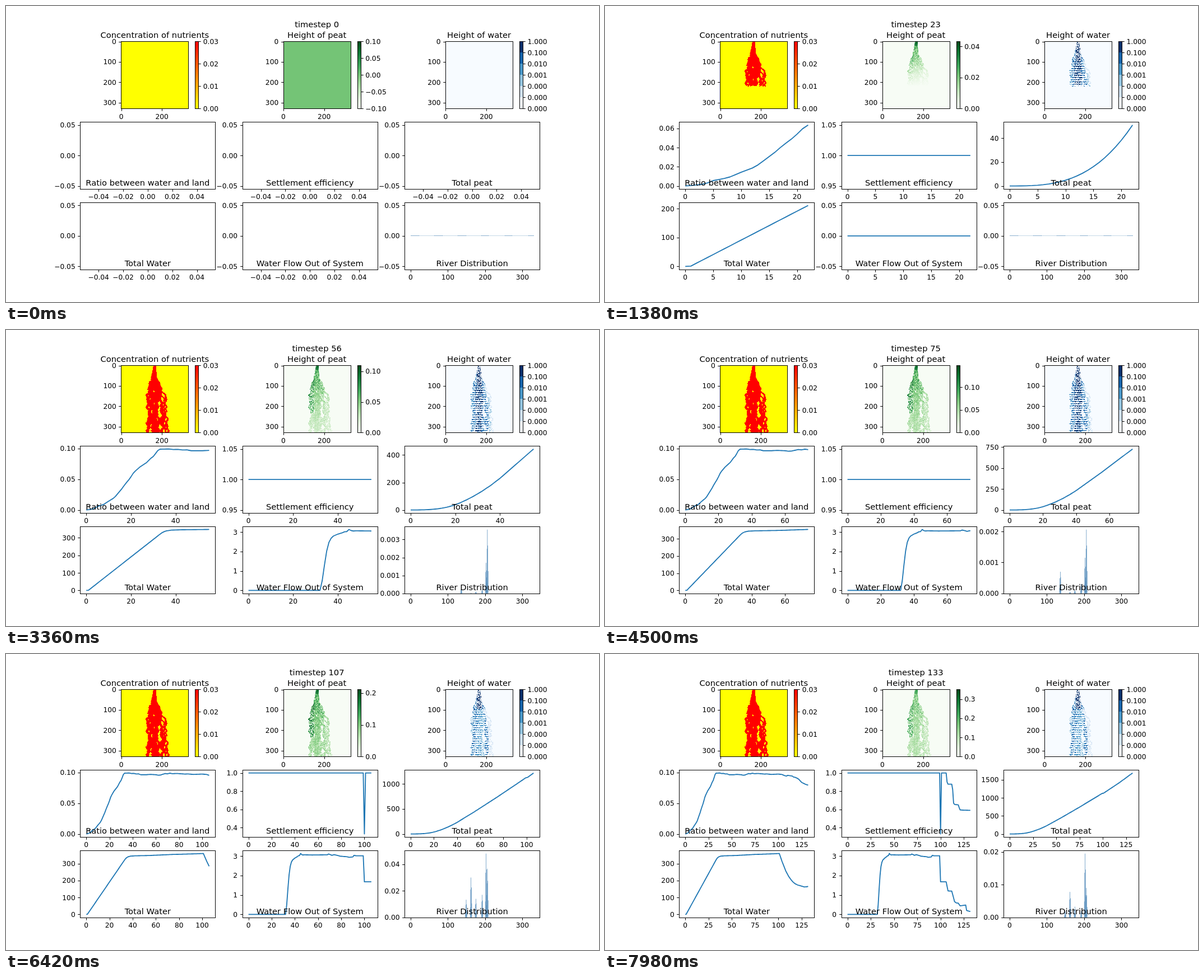
Animation of 1058 by 529 pixels, one loop 8000 ms. Source, as an HTML page with a canvas:

```html
<!DOCTYPE html>
<html lang="en">
<head>
<meta charset="utf-8">
<title>Peat simulation</title>
<style>
html, body { margin: 0; width: 100%; height: 100%; overflow: hidden; background: #fff; }
canvas { display: block; }
</style>
</head>
<body>
<canvas id="stage" width="1058" height="529"></canvas>
<script>
const ctx = document.getElementById('stage').getContext('2d');
const LOOP = 8000, STEP = 60, PT = 1058 / 12 / 72;
const SMALL = 10 * PT, LARGE = 12 * PT, TICK = 3.5 * PT;
const AW = 241.16, AH = 119.8, SIZE = 120, UNIT = AH / 330;
const colX = c => 132.25 + c * 289.395;
const rowY = r => 63.48 + r * 143.76;
const snap = v => Math.round(v) + .5;

// Time series as flat index/value pairs
const RATIO = [0, 9.18e-6, 1, .0004, 2, .001, 3, .0018, 4, .0032, 5, .0056, 7, .0079, 8, .0094,
  10, .0143, 12, .0187, 13, .0219, 15, .0306, 16, .0349, 17, .04, 18, .0446, 19, .0489, 20, .054,
  21, .0597, 22, .0636, 24, .07, 27, .0772, 29, .0845, 30, .0872, 31, .0918, 32, .0968, 33, .099,
  37, .0993, 39, .0985, 41, .0986, 43, .0977, 45, .0979, 47, .0965, 52, .0965, 55, .0971,
  60, .0965, 62, .0957, 64, .096, 66, .0972, 68, .0984, 70, .0979, 72, .099, 74, .0982, 78, .0985,
  85, .0976, 88, .0978, 92, .097, 100, .0976, 104, .0968, 107, .0949, 109, .0944, 110, .0955,
  115, .0943, 116, .093, 118, .0922, 120, .091, 122, .089, 125, .084, 129, .081, 132, .0795];
const SETTLE = [0, 1, 99, 1, 100, .331, 101, 1, 106, 1, 107, .9, 108, .878, 112, .878, 113, .82,
  114, .67, 115, .655, 119, .65, 120, .62, 121, .595, 125, .592, 132, .59];
const PEAT = [22, 51, 25, 73.4, 28, 98.7, 32, 137, 36, 181, 40, 231, 55, 444, 74, 728, 95, 1055,
  99, 1120, 101, 1133, 118, 1425, 132, 1690];
const WATER = [0, 0, 1, 1, 33, 321, 34, 330, 35, 336, 36, 340, 38, 344, 42, 346, 55, 348, 74, 354,
  95, 358, 101, 360, 104, 312, 108, 256, 111, 225, 114, 202, 116, 190, 118, 181, 121, 173,
  125, 167, 128, 162, 130, 163, 132, 165];
const FLOW = [0, 0, 32, 0, 33, .5, 34, 1.3, 35, 2.02, 36, 2.47, 37, 2.69, 38, 2.8, 40, 2.9,
  42, 2.97, 43, 3.02, 44, 3.03, 45, 3.14, 46, 3.08, 47, 3.06, 48, 3.07, 55, 3.06, 68, 3.07,
  69, 3.11, 71, 3.07, 72, 3.04, 74, 3.08, 76, 3.05, 79, 3, 85, 2.97, 87, 2.94, 90, 2.96,
  91, 3.04, 93, 3.02, 99, 3.02, 100, 1.68, 106, 1.68, 108, 1.21, 112, 1.2, 114, .85, 115, .66,
  117, .59, 119, .58, 121, .44, 124, .46, 127, .48, 128, .2, 130, .17, 132, .15];
const PEAT_MAX = [0, 0, 23, .0431, 56, .1096, 75, .1474, 96, .1906, 119, .2342, 133, .3497];

const PEAKS = [136, 149, 162, 175, 192, 202.5, 206];
const PROFILE = [.25, .7, 1, .75, .35];
const RIVER = [
  [33, .0001, 0, 0, 0, .0001, .0008, .0015],
  [56, .0003, 0, .00002, .0001, .0002, .0017, .00355],
  [75, .0007, 0, .00005, .0001, .0003, .00115, .00206],
  [96, .0021, 0, .00005, .0001, .0006, .0046, .0038],
  [100, .0021, 0, .0001, .0001, .0006, .0046, .0038],
  [101, 0, .01, .02, .01, .01, .03, .025],
  [119, 0, .02, .05, .022, .031, .084, .06],
  [133, 0, .002, .0078, .0033, .002, .0195, .009]];

function at(p, x) {
  if (x <= p[0]) return p[1];
  let i = 2;
  while (i < p.length - 2 && p[i] < x) i += 2;
  const k = Math.min(1, (x - p[i - 2]) / (p[i] - p[i - 2]));
  return p[i - 1] + (p[i + 1] - p[i - 1]) * k;
}
const peatAt = i => i < 22 ? .00479 * i ** 3 : at(PEAT, i);

function limits(lo, hi) {
  if (lo === hi) {
    const d = lo ? Math.abs(lo) * .05 : .05;
    lo -= d; hi += d;
  }
  const m = (hi - lo) * .05;
  return [lo - m, hi + m];
}

function ticks([lo, hi], bins) {
  const raw = (hi - lo) / bins, mag = 10 ** Math.floor(Math.log10(raw));
  const steps = [.1, .2, .25, .5, 1, 2, 2.5, 5, 10].map(s => s * mag);
  let i = steps.findIndex(s => s >= raw * (1 - 1e-9)), list, step;
  do {
    step = steps[i--];
    list = [];
    for (let k = Math.ceil(lo / step - 1e-9); k * step <= hi + step * 1e-9; k++) list.push(k * step);
  } while (list.length < 2 && i >= 0);
  let dec = 0;
  while (dec < 9 && Math.abs(step * 10 ** dec - Math.round(step * 10 ** dec)) > 1e-8) dec++;
  return list.map(v => [v, (v < 0 ? '\u2212' : '') + Math.abs(v).toFixed(dec)]);
}

function text(s, x, y, size, align) {
  ctx.font = `${size}px "DejaVu Sans", sans-serif`;
  ctx.textAlign = align;
  ctx.fillStyle = '#000';
  ctx.fillText(s, x, Math.round(y));
}
function line(x0, y0, x1, y1) {
  ctx.beginPath();
  ctx.moveTo(x0, y0);
  ctx.lineTo(x1, y1);
  ctx.stroke();
}
function box(x, y, w, h) {
  ctx.strokeStyle = '#000';
  ctx.lineWidth = .98;
  const l = snap(x), t = snap(y);
  ctx.strokeRect(l, t, snap(x + w) - l, snap(y + h) - t);
}
function xTick(x, y, label) {
  line(snap(x), snap(y), snap(x), snap(y) + TICK);
  text(label, x, y + 18.4, SMALL, 'center');
}
function yTick(x, y, label, side = -1) {
  line(snap(x), snap(y), snap(x) + side * TICK, snap(y));
  text(label, x + side * 2 * TICK, y + 4.5, SMALL, side < 0 ? 'right' : 'left');
}

// Delta network: each strand is a width and x positions every 20 rows
const STRANDS = [
  [7, 60, 60, 61, 62, 60, 59, 60],
  [5, 60, 58, 56, 57, 59, 58, 57],
  [4, 60, 57, 52, 50, 53, 49, 47],
  [3, 60, 56, 50, 47, 49, 51, 48],
  [4, 60, 61, 65, 66, 63, 67, 65],
  [3, 60, 61, 67, 71, 73, 72, 74],
  [2, 60, 62, 68, 76, 79, 78, 80],
  [2, 60, 62, 71, 81, 78, 82, 83],
  [3, 60, 59, 63, 68, 75, 75, 73],
  [4, 60, 58, 54, 53, 57, 63, 64]];
const WET = [5, 5, 4, 3, 4, 4, 2, 1, 4, 5];
const DRY = [3, 4, 4, 2, 2, 4, 1, 1, 4, 3];
const BLUES = ['#f7fbff', '#d0e1f2', '#94c4df', '#4a98c9', '#1764ab', '#08306b'];
const GREENS = ['f7fcf5', 'e5f5e0', 'c7e9c0', 'a1d99b', '74c476', '41ab5d', '238b45', '006d2c', '00441b']
  .map(h => [0, 2, 4].map(i => parseInt(h.substr(i, 2), 16)));

function green(v) {
  v = Math.max(0, Math.min(1, v)) * 8;
  const i = Math.min(7, Math.floor(v));
  return `rgb(${GREENS[i].map((c, k) => Math.round(c + (GREENS[i + 1][k] - c) * (v - i)))})`;
}
function hash(x, y, s = 0) {
  const v = Math.sin(x * 127.1 + y * 311.7 + s * 74.7) * 43758.5453;
  return v - Math.floor(v);
}

const cells = [];
(function grow() {
  const seen = new Set();
  STRANDS.forEach(([w, ...xs], s) => {
    for (let y = 0; y < SIZE; y++) {
      const i = Math.floor(y / 20), f = y / 20 - i, spread = Math.min(1, y / 45);
      const sway = Math.sin(y * .31 + s * 2.3) * 1.2 + Math.sin(y * .57 + s * 4.1) * .9;
      const mid = xs[i] + (xs[i + 1] - xs[i]) * f + sway * spread;
      const half = (1.6 + (w / 2 - 1.2) * spread) * (.75 + .6 * hash(s, y >> 1));
      for (let x = Math.round(mid - half); x <= Math.round(mid + half - .4); x++) {
        const key = y * SIZE + x;
        if (seen.has(key)) continue;
        seen.add(key);
        cells.push({ x, y, s, a: hash(x, y, 1), b: hash(x >> 1, y >> 1, 2) });
      }
    }
  });
})();

const pane = document.createElement('canvas');
pane.width = pane.height = SIZE + 1;
const pc = pane.getContext('2d');

function heatmap(col, n, bg, shade) {
  const x = colX(col) + .8 * AW - AH, y = rowY(0);
  pc.fillStyle = bg;
  pc.fillRect(0, 0, SIZE + 1, SIZE + 1);
  const front = 3.5 * n;
  for (const c of cells) {
    if (n < 1 || c.y > front - c.b * 2) continue;
    const color = shade(c);
    if (!color) continue;
    pc.fillStyle = color;
    pc.fillRect(c.x, c.y, 1, 1);
  }
  ctx.drawImage(pane, Math.round(x), Math.round(y));
  box(x, y, AH, AH);
  for (const v of [0, 200]) xTick(x + (v + .5) * UNIT, y + AH, v);
  for (const v of [0, 100, 200, 300]) yTick(x, y + (v + .5) * UNIT, v);
}

function colorbar(col, paint, marks) {
  const x = colX(col) + .85 * AW, y = rowY(0), w = AH / 20;
  paint(Math.round(x), Math.round(y), 6);
  box(x, y, w, AH);
  for (const [k, label] of marks) yTick(x + w, y + AH * (1 - k), label, 1);
}
const gradient = (...stops) => (x, y, w) => {
  const g = ctx.createLinearGradient(0, y + AH, 0, y);
  stops.forEach((c, i) => g.addColorStop(i / (stops.length - 1), c));
  ctx.fillStyle = g;
  ctx.fillRect(x, y, w, SIZE);
};
const bands = (x, y, w) => BLUES.forEach((c, i) => {
  ctx.fillStyle = c;
  ctx.fillRect(x, y + SIZE - (i + 1) * 20, w, 20);
});

function waterLevel(c, n) {
  const row = c.y % 4 < 1, dry = n > 100 && c.y > 35;
  let level = (dry ? DRY : WET)[c.s];
  if (c.y < 36) return c.a < .48 ? (Math.abs(c.x - 60) < 5 ? 5 : 4 - (c.b > .5)) : 0;
  if (level < 3) return c.a < .5 ? level : 0;
  if (row) return c.b < .85 ? level : level - 1;
  if (c.y % 4 === 1 && c.b < .35) return level;
  return c.a < .16 ? level - 1 : 0;
}

function peatShade(c, n, max) {
  if (c.a < .2 && c.s > 1) return null;
  const age = Math.max(0, 1 - c.y / 3.5 / n);
  let k = .38 + .25 * c.b;
  if (c.y < 8) k = .6 + .4 * c.a;
  else if (c.x < 55 && c.y > 26 && c.y < 85 && c.a > .68) k = 1.05;
  else if (c.y < 45 && c.a > .85) k = .85;
  if (c.s > 5) k *= .8;
  return green(age * k * .00197 * n / max);
}

function chart(col, row, title, xl, yl, draw) {
  const x = colX(col), y = rowY(row);
  const px = v => x + (v - xl[0]) / (xl[1] - xl[0]) * AW;
  const py = v => y + AH - (v - yl[0]) / (yl[1] - yl[0]) * AH;
  ctx.save();
  ctx.beginPath();
  ctx.rect(x, y, AW, AH);
  ctx.clip();
  draw(px, py);
  ctx.restore();
  box(x, y, AW, AH);
  for (const [v, s] of ticks(xl, 6)) xTick(px(v), y + AH, s);
  for (const [v, s] of ticks(yl, 4)) yTick(x, py(v), s);
  text(title, x + AW / 2, y + AH - 5 * PT, LARGE, 'center');
}

function series(col, row, title, n, value) {
  const data = Array.from({ length: n }, (_, i) => value(i));
  const yl = n ? limits(Math.min(...data), Math.max(...data)) : limits(0, 0);
  chart(col, row, title, limits(0, Math.max(0, n - 1)), yl, (px, py) => {
    ctx.strokeStyle = '#1f77b4';
    ctx.lineWidth = 1.5 * PT;
    ctx.lineJoin = 'round';
    ctx.beginPath();
    data.forEach((v, i) => ctx.lineTo(px(i), py(v)));
    if (n > 1) ctx.stroke();
  });
}

function river(n) {
  const wet = n >= 33;
  const tops = PEAKS.map((_, k) => at(RIVER.flatMap(r => [r[0], r[k + 1]]), n));
  const yl = wet ? [0, Math.max(...tops) * 1.05] : limits(0, 0);
  chart(2, 2, 'River Distribution', limits(0, 330), yl, (px, py) => {
    ctx.fillStyle = '#4682b4';
    if (wet) {
      tops.forEach((h, k) => PROFILE.forEach((f, d) => {
        const l = px(PEAKS[k] + d - 2.5);
        ctx.fillRect(l, py(h * f), px(PEAKS[k] + d - 1.5) - l, py(0) - py(h * f));
      }));
      return;
    }
    ctx.globalAlpha = .62;
    const y = Math.floor(py(0));
    for (let x = 722; x < 942; x++) {
      if ((x - 722) % 41.6 < 15 || x % 2) ctx.fillRect(x, y, 1, 1);
    }
  });
}

function render(n) {
  ctx.fillStyle = '#fff';
  ctx.fillRect(0, 0, 1058, 529);

  const max = at(PEAT_MAX, n), range = n ? [0, max] : [-.1, .1];
  heatmap(0, n, '#ff0', () => '#f00');
  heatmap(1, n, green(n ? 0 : .5), c => peatShade(c, n, max));
  heatmap(2, n, BLUES[0], c => BLUES[waterLevel(c, n)]);
  colorbar(0, gradient('#ff0', '#f00'), [0, 1, 2, 3].map(i => [i / 3, `0.0${i}`]));
  colorbar(1, gradient(...GREENS.map(c => `rgb(${c})`)),
    ticks(range, 4).map(([v, s]) => [(v - range[0]) / (range[1] - range[0]), s]));
  colorbar(2, bands, [0, 0, 0, .001, .01, .1, 1].map((v, i) => [i / 6, v.toFixed(3)]));
  ['Concentration of nutrients', 'Height of peat', 'Height of water'].forEach((s, i) =>
    text(s, colX(i) + .8 * AW - AH / 2, 57, LARGE, 'center'));
  text(`timestep ${n}`, colX(1) + .8 * AW - AH / 2, 38, LARGE, 'center');

  series(0, 1, 'Ratio between water and land', n, i => at(RATIO, i));
  series(1, 1, 'Settlement efficiency', n, i => at(SETTLE, i));
  series(2, 1, 'Total peat', n, peatAt);
  series(0, 2, 'Total Water', n, i => at(WATER, i));
  series(1, 2, 'Water Flow Out of System', n, i => at(FLOW, i));
  river(n);
}

let shown = -1;
const start = performance.now();
function tick() {
  const n = Math.floor((performance.now() - start) % LOOP / STEP);
  if (n !== shown) render(shown = n);
  requestAnimationFrame(tick);
}
tick();
</script>
</body>
</html>
```
